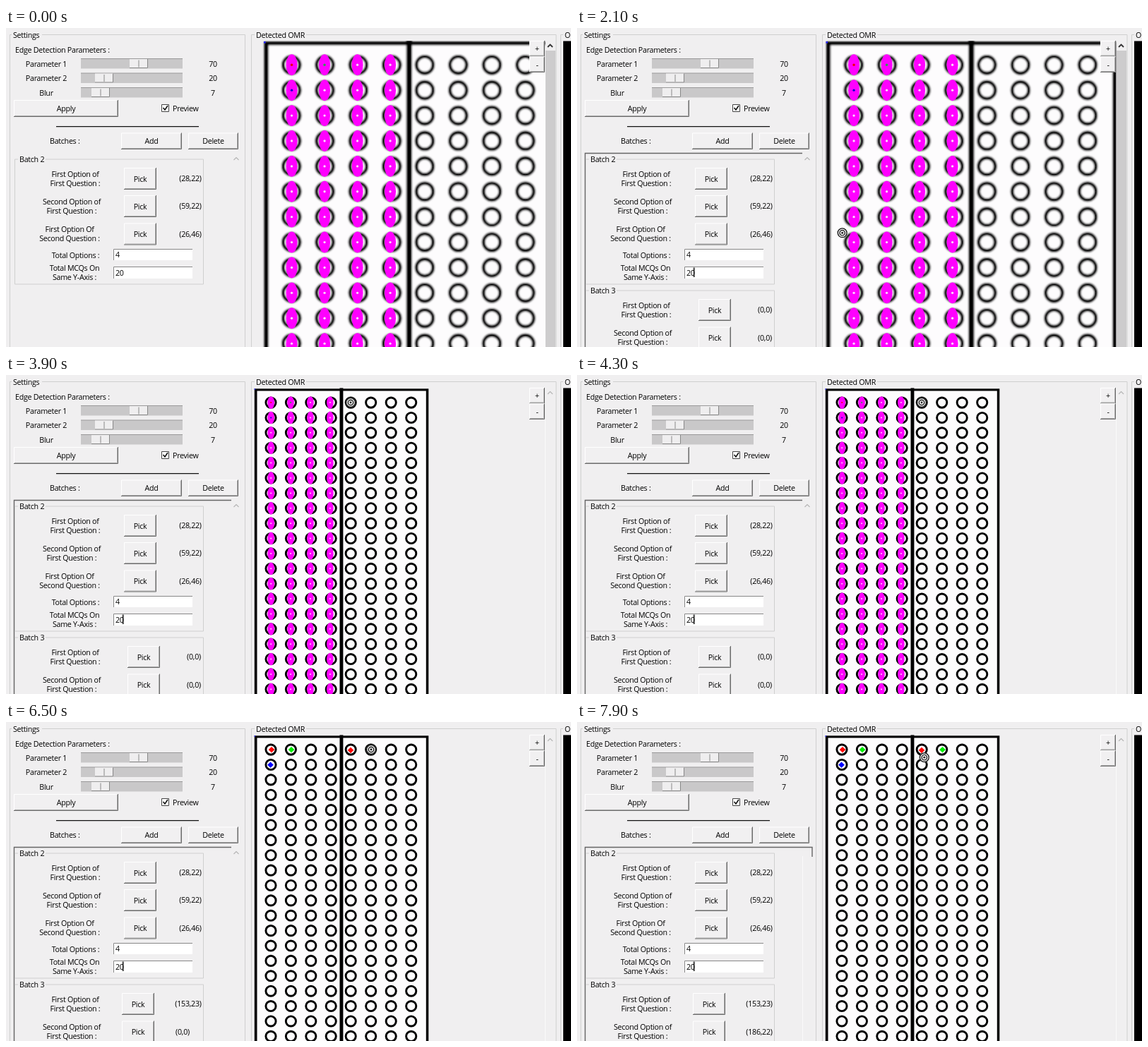
An HTML page that plays this animation: 800x452 px, repeating every 8 s.

```html
<!DOCTYPE html>
<html lang="en">
<head>
<meta charset="utf-8">
<title>OMR settings</title>
<style>
  html, body { margin: 0; width: 100%; height: 100%; overflow: hidden; background: #f0eff0; }
  svg { display: block; width: 800px; height: 452px; }
  text { font: 10.7px "Open Sans", "Noto Sans", sans-serif; letter-spacing: -.28px; fill: #000; white-space: pre; }
</style>
</head>
<body>
<svg viewBox="0 0 800 452">
  <defs>
    <clipPath id="view"><rect x="340" y="18" width="423.5" height="434"/></clipPath>
    <filter id="soft" filterUnits="userSpaceOnUse" x="-5" y="-5" width="260" height="480"><feGaussianBlur stdDeviation=".5"/></filter>
  </defs>
  <g id="scene"></g><g id="caret"></g><g id="cursor"></g>
</svg>
<script>
const LOOP = 8000, BG = '#f0eff0', EDGE = '#cfcfcf', MAGENTA = '#ff00ff';
const scene = document.getElementById('scene');
const caret = document.getElementById('caret');
const cursor = document.getElementById('cursor');

// Basic shapes
const rect = (x, y, w, h, fill) => `<rect x="${x}" y="${y}" width="${w}" height="${h}" fill="${fill}"/>`;
const path = (d, stroke, w = 1, fill = 'none') => `<path d="${d}" stroke="${stroke}" stroke-width="${w}" fill="${fill}"/>`;
const text = (s, x, y, anchor = 'middle') => `<text x="${x}" y="${y + 4}" text-anchor="${anchor}">${s}</text>`;
const left = (s, x, y) => text(s, x, y, 'start');
const disc = (x, y, r, fill) => `<circle cx="${x}" cy="${y}" r="${r}" fill="${fill}"/>`;
const ring = (x, y, r, stroke, w) => `<circle cx="${x}" cy="${y}" r="${r}" stroke="${stroke}" stroke-width="${w}" fill="none"/>`;
const diamond = (x, y, fill) => path(`M${x - 4.3} ${y}l4.3-4.3 4.3 4.3-4.3 4.3z`, 'none', 0, fill);

// Widgets
const button = (label, x0, x1, y, h) =>
  rect(x0, y, x1 - x0, h, '#f1f0f1') +
  path(`M${x0 + .5} ${y + h}V${y + .5}H${x1}`, '#fff') +
  path(`M${x0 + 1} ${y + h - 1.5}H${x1 - 1.5}V${y + 1}`, '#aaa') +
  path(`M${x0} ${y + h - .5}H${x1 - .5}V${y}`, '#6c6c6c') +
  text(label, (x0 + x1) / 2, y + h / 2);

const group = (label, x0, x1, y, bottom, labelX, labelW) =>
  path(`M${labelX - 2} ${y}H${x0}V${bottom}H${x1}V${y}H${labelX + labelW}`, EDGE) +
  left(label, labelX, y);

const slider = (x0, x1, thumb, y) =>
  rect(x0, y - 7, x1 - x0, 14, '#c9c8c9') + path(`M${x0} ${y - 7}H${x1}`, '#999') +
  rect(thumb, y - 6.5, 26, 13, '#efeeef') +
  path(`M${thumb} ${y + 6}h25.5v-12.5M${thumb + 13} ${y - 5}v10`, '#888');

const field = (value, y, h) =>
  rect(152, y, 112, h, '#fff') + path(`M152.5 ${y + h}V${y + .5}H264`, '#888') + left(value, 155, y + h / 2);

const chevron = (x, y, color, w) => path(`M${x - 3.5} ${y + 2}l3.5-3.5 3.5 3.5`, color, w);

function pickRow(y, lines, x, pickX, value, valueX) {
  return text(lines[0], x, y - 6.5) + text(lines[1], x, y + 6.5) +
    button('Pick', pickX, pickX + 46, y - 15, 31) + text(value, valueX, y);
}

const FIRST = ['First Option of', 'First Question :'];
const SECOND = ['Second Option of', 'First Question :'];
const THIRD = ['First Option Of', 'Second Question :'];

function settings(s) {
  const n = s.narrow, pick = (a, b) => n ? b : a;
  let out = group('Settings', 5.5, 338.5, 9.5, 460, 10, 41) +
    left('Edge Detection Parameters :', 13, 31);
  [['Parameter 1', 70, 175, 167], ['Parameter 2', 20, 126, 121], ['Blur', 7, 121, 116]].forEach(([name, v, a, b], i) => {
    const y = 50.5 + i * 20.5;
    out += text(name, pick(57, 55), y) + slider(pick(106, 102), pick(250, 239), pick(a, b), y) + text(v, pick(293, 281), y);
  });
  const check = pick(220, 209), rule = pick(71, 64);
  out += button('Apply', 11, pick(159, 152), 102, 24) +
    rect(check + .5, 108.5, 10, 10, '#fff') + path(`M${check + .5} 108.5h10v10h-10z`, '#444') +
    path(`M${check + 2.5} 113l2.5 3 4-6`, '#111', 1.6) + left('Preview', pick(236, 225), 114) +
    path(`M${rule} 139.7h202`, '#111', 1.2) + left('Batches :', pick(62, 58), 160) +
    button('Add', pick(163, 156), pick(249, 239), 148.5, 23.5) +
    button('Delete', pick(258, 247), pick(329, 315), 148.5, 23.5);

  // Scrollable batch list
  if (s.batch3) {
    const right = n ? 318 : s.bare ? 333 : 319;
    out += path(`M11.5 452V177.5H${right}${s.bare || n ? 'V191' : ''}`, '#666', 1.4);
  }
  if (s.bare || n) out += path(`M${pick(319.5, 306.5)} 190V452`, '#fafafa');
  else out += chevron(326, 185, '#b5b5b5', 1.2);

  out += group('Batch 2', 12.5, 279.5, 186, 363, 19, 37) +
    pickRow(213, FIRST, 98, 167, '(28,22)', 261) +
    pickRow(252, SECOND, 93, 167, '(59,22)', 261) +
    pickRow(291.5, THIRD, 90, 167, '(26,46)', 261) +
    text('Total Options :', 98.5, 321.5) + field('4', 313, 16) +
    text('Total MCQs On', 97, 340) + text('Same Y-Axis :', 97, 353) + field('20', 338, 17);
  if (s.batch3) {
    const x = s.picked ? 164 : 172, v = s.picked ? 258 : 266;
    out += group('Batch 3', 12.5, 279.5, 372, 460, 19, 37) +
      pickRow(399, FIRST, 98, x, s.picked ? '(153,23)' : '(0,0)', v) +
      pickRow(438.5, SECOND, 93, x, s.picked > 1 ? '(186,22)' : '(0,0)', s.picked == 1 ? 250 : v);
  }
  return out;
}

function sheet(s) {
  let ink = rect(.8, .9, 246.5, 460, '#000') + rect(4.5, 4, 239.3, 460, '#fdfcfd') + rect(121.5, 0, 4.9, 460, '#000');
  let marks = '';
  for (let row = 0; row < 20; row++) {
    const y = 20.6 + row * 21.38;
    for (let col = 0; col < 8; col++) {
      const x = col < 4 ? 24 + col * 28.4 : 137.2 + (col - 4) * 28.5;
      ink += ring(x, y, 7.1, '#000', 2.9);
      if (col < 4 && !s.picked) {
        const mx = 24.2 + col * 27.9;
        const dot = row == 0 && col == 0 ? '#e00' : row == 0 && col == 1 ? '#2a4' : row == 1 && col == 0 ? '#00c' : '#fbd8fb';
        marks += `<ellipse cx="${mx}" cy="${y}" rx="4.8" ry="8.9" fill="${MAGENTA}"/>` + disc(mx, y, 1, dot);
      }
    }
  }
  return `<g filter="url(#soft)">${ink}</g>` + marks + rect(.5, .8, 1.5, 1.5, '#22f');
}

function detected(s) {
  const x0 = s.shifted ? 334.5 : 347.5, labelX = s.shifted ? 339 : 354;
  const sx = s.small ? 1 : 1.667, sy = s.small ? 1 : 1.679;
  const ox = s.small ? 351 : s.batch3 ? 351.7 : 364.2, oy = s.small ? 18.5 : 17.7;
  let out = '';
  if (s.narrow) out += rect(339.5, 18.5, 12, 440, '#000') + rect(343, 22, 9, 440, '#fdfcfd') + left('D', 339, 9.5);
  out += group('Detected OMR', x0, 779, 9.5, 460, labelX, 71);
  if (s.shifted) out += path('M347.5 18V452', '#ddd');
  out += `<g clip-path="url(#view)"><g transform="translate(${ox} ${oy}) scale(${sx} ${sy})">${sheet(s)}</g></g>`;
  if (!s.small) out += rect(764, 18, 14, 434, '#cdcccd') + rect(764, 18, 14, 14, BG);
  else if (!s.narrow) out += path('M763.5 18V452', '#fafafa');
  if (!s.narrow) {
    out += button('+', 741, 763, 18, 22.5) + button('-', 741, 763, 40.5, 22.5);
    if (!s.shifted) out += chevron(770.5, 25, s.small ? '#b5b5b5' : '#333', s.small ? 1.2 : 1.8);
  }
  if (s.picked) {
    out += diamond(376, 39.3, '#f00') + diamond(404, 39.3, '#0e0') + diamond(374.5, 60.7, '#00f') + diamond(488, 40, '#f00');
    if (s.picked > 1) out += diamond(517.5, 39.3, '#0e0');
  }
  if (!s.shifted)
    out += path('M789 9.5H785.5V452', EDGE) + left('O', 791, 9.5) + rect(789, 18.5, 11, 434, '#000');
  return out;
}

// Every pick squeezes the panels, then the list redraws before its scrollbar returns
const ADD = 1000, ZOOM = 2200, PICK1 = 4900, PICK2 = 7600;
const between = (t, a, b) => t >= a && t < b;
const stateAt = t => ({
  batch3: t >= ADD,
  small: t >= ZOOM,
  shifted: between(t, ZOOM, ZOOM + 200),
  picked: (t >= PICK1) + (t >= PICK2),
  narrow: between(t, PICK1, PICK1 + 300) || between(t, PICK2, PICK2 + 200),
  bare: between(t, ADD, ADD + 400) || between(t, PICK1 + 300, PICK1 + 500) || t >= PICK2 + 200
});

// Pointer route: time, x, y
const route = [
  [250, 225, 330], [750, 207, 162], [1000, 207, 162], [1200, 201, 192], [1550, 194, 400], [1750, 194, 400],
  [2150, 401, 275], [2600, 401, 275], [3400, 488, 39], [4900, 488, 39], [5100, 470, 101],
  [5550, 188, 438], [5800, 188, 438], [6350, 517, 39], [7600, 517, 39], [7900, 492, 50], [8000, 470, 72]
];

function pointerAt(t) {
  const i = route.findIndex(k => k[0] > t);
  if (i < 1) return null;
  const [ta, xa, ya] = route[i - 1], [tb, xb, yb] = route[i], p = (t - ta) / (tb - ta);
  return [xa + (xb - xa) * p, ya + (yb - ya) * p];
}

const ARROW = path('M0 0V16l3.7-3.4 2.6 6 2.6-1.2-2.6-5.6h5z', '#eee', .7, '#000');
const TARGET = disc(0, 0, 7, '#eee') + ring(0, 0, 6.4, '#111', 1.3) + ring(0, 0, 3.7, '#111', 1.2) + disc(0, 0, 1.4, '#111');

caret.innerHTML = rect(165, 339.5, 1.4, 13.5, '#000');
let shownState, shownShape;

function frame() {
  const t = performance.now() % LOOP, s = stateAt(t), key = JSON.stringify(s);
  if (key != shownState) {
    scene.innerHTML = rect(0, 0, 800, 452, BG) + settings(s) + detected(s);
    shownState = key;
  }
  caret.style.display = between(t % 900, 150, 750) ? '' : 'none';
  const pos = pointerAt(t);
  cursor.style.display = pos ? '' : 'none';
  if (pos) {
    const shape = t > 1700 && pos[0] > 347 ? TARGET : ARROW;
    if (shape != shownShape) cursor.innerHTML = shownShape = shape;
    cursor.setAttribute('transform', `translate(${pos})`);
  }
  requestAnimationFrame(frame);
}
frame();
</script>
</body>
</html>
```
